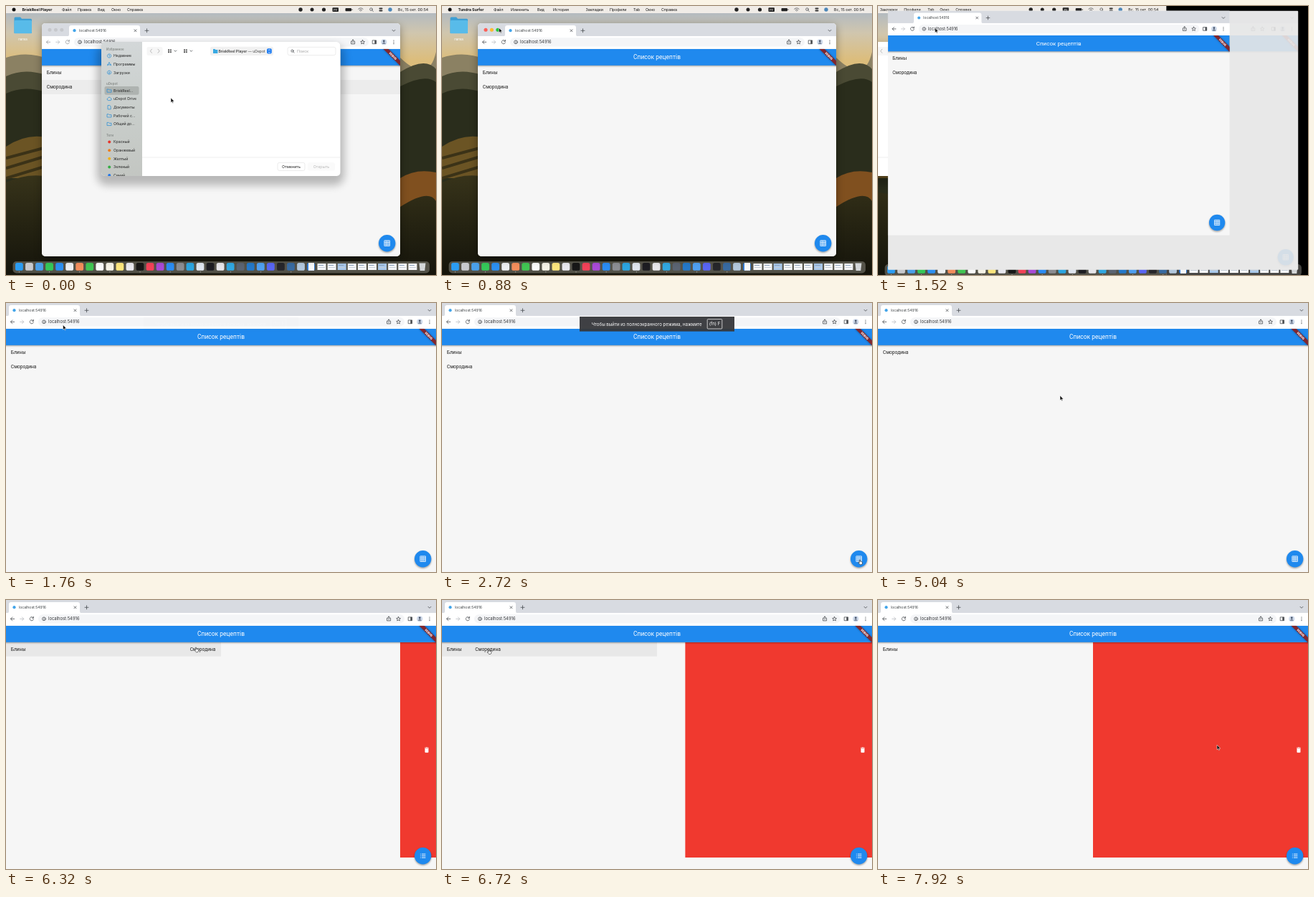
Recreate the animation shown at these times as an HTML page. Size 600 by 375 pixels, loop 8000 ms.

```html
<!DOCTYPE html>
<html lang="ru">
<head>
<meta charset="utf-8">
<title>Список рецептів</title>
<style>
html, body { margin: 0; width: 100%; height: 100%; overflow: hidden; background: #f6f6f6; }
svg { display: block; width: 100vw; height: 100vh; }
text { font-family: Inter, sans-serif; white-space: pre; }
.app text { font-family: Roboto, sans-serif; }
.line { fill: none; stroke: #4a4d51; stroke-width: .8; stroke-linecap: round; stroke-linejoin: round; }
</style>
</head>
<body>
<svg id="stage" viewBox="0 0 600 375" preserveAspectRatio="none"></svg>
<script>
const LOOP = 8000, BAR = 35.7, TOP = 59, ROW = 20, CELL = 300;
const BLUE = '#1f89ee', RED = '#f0392f', PAGE = '#f6f6f6';

// Markup helpers; text is centred on y
const rect = (x, y, w, h, fill, more = '') =>
  `<rect x="${x}" y="${y}" width="${w}" height="${h}" fill="${fill}" ${more}/>`;
const dot = (x, y, r, fill, more = '') =>
  `<circle cx="${x}" cy="${y}" r="${r}" fill="${fill}" ${more}/>`;
const path = (d, more = 'class="line"') => `<path d="${d}" ${more}/>`;
const text = (x, y, s, size, fill = '#222', more = '') =>
  `<text x="${x}" y="${y + size * .36}" font-size="${size}" fill="${fill}" ${more}>${s}</text>`;
const group = (id, body) => `<g id="${id}">${body}</g>`;

const gridIcon = path('M3 3H21V21H3ZM9 3V21M15 3V21M3 9H21M3 15H21', 'fill="none" stroke="#fff" stroke-width="2"');
const listIcon = path('M8 6H21M8 12H21M8 18H21M3 6H5M3 12H5M3 18H5', 'fill="none" stroke="#fff" stroke-width="2.2"');
const binIcon = path('M6 19c0 1.1.9 2 2 2h8c1.1 0 2-.9 2-2V7H6zM19 4h-3.5l-1-1h-5l-1 1H5v2h14z', 'fill="#fff"');

function fab(w, h, icons) {
  return `<g transform="translate(${w - 18.3} ${h - 18.3})">
    ${dot(0, 1.4, 11.9, '#000', 'opacity=".32" filter="url(#soft)"')}${dot(0, 0, 11.7, BLUE)}
    <g transform="translate(-5 -5) scale(.4167)">${icons}</g></g>`;
}

function toolbar(name, w, tab) {
  const x = tab + 4, r = w - 600;
  return rect(0, 0, w, 18.5, '#d8dbe1') +
    path(`M${x - 3} 18.5q3 0 3-3V6q0-3 3-3H${x + 96}q3 0 3 3V15.5q0 3 3 3Z`, 'fill="#fff"') +
    dot(x + 7.5, 10.2, 2.1, '#42a5ea') +
    text(x + 14, 10.2, 'localhost:54916', 5.1, '#3c4043') +
    path(`M${x + 91} 8.8l3 3m0-3l-3 3M${x + 106} 10.3h5m-2.5-2.5v5M${r + 589} 9.3l2 2 2-2`) +
    rect(0, 18, w, BAR - 18, '#fff') +
    rect(45, 20.2, w - 89, 12.2, '#f4f5f7', 'rx="6.1"') +
    group(name + 'Nav', path('M11.7 26.3H6.6m2.3-2.4l-2.4 2.4 2.4 2.4M38 24.7a2.6 2.6 0 1 0 .4 2.2M38.4 23.3v1.9h-2')) +
    path('M19.7 26.3h5m-2.3-2.4l2.4 2.4-2.4 2.4', 'class="line" style="stroke:#b9bcc0"') +
    dot(53, 26.3, 2.4, 'none', 'class="line"') + path('M53 26.2v1.2m0-2.5v.1') +
    text(59, 26.3, 'localhost:54916', 5.85, '#303235') +
    `<g transform="translate(${r} 0)">` +
    path('M532.6 25.2h-1v3.7h5v-3.7h-1M534.1 27.2v-4.2m-1.3 1.2l1.3-1.3 1.3 1.3M547.6 23.4l.9 1.9 2 .2-1.5 1.4.4 2-1.8-1-1.8 1 .4-2-1.5-1.4 2-.2ZM561.6 23.9h5v4.8h-5Z') +
    rect(564.3, 23.9, 2.4, 4.8, '#4a4d51') +
    dot(577.3, 26.3, 4.1, '#cfdaea') + dot(577.3, 25, 1.4, '#47536a') +
    path('M574.6 28.6q2.7-3.4 5.4 0Z', 'fill="#47536a"') +
    [24.1, 26.3, 28.5].map(y => dot(591, y, .65, '#4a4d51')).join('') + '</g>';
}

function browser(name, w, h, tab, body, icons) {
  return `<clipPath id="${name}Clip">${rect(0, BAR, w, h - BAR, '#000')}</clipPath>` +
    rect(0, 0, w, h, PAGE) +
    `<g class="app" clip-path="url(#${name}Clip)">${body}
      ${rect(-4, BAR, w + 8, 24, '#000', 'opacity=".4" filter="url(#soft)"')}
      ${rect(0, BAR, w, TOP - BAR - .2, BLUE)}
      ${text(w / 2, 47.4, 'Список рецептів', 8.4, '#fff', 'letter-spacing=".06" text-anchor="middle"')}
      <g transform="translate(${w} ${BAR}) rotate(45)">
        ${rect(-17, 11.2, 34, 6, '#000', 'opacity=".3" filter="url(#soft)"')}
        ${rect(-17, 11.7, 34, 5, '#80272f')}
        ${text(0, 14.2, 'DEBUG', 4.2, '#fff', 'font-weight="900" text-anchor="middle"')}</g>
      ${fab(w, h, icons)}</g>` + toolbar(name, w, tab);
}

const item = (s, y) => text(6.8, y, s, 6.67, '#222');

function fileDialog() {
  const icons = {
    clock: 'M144 -2.6a2.6 2.6 0 1 0 .01 0M144 -1.4V.2l1.1.6',
    app: 'M141.5 2.3L144-2.6l2.5 4.9M141 .9h6',
    load: 'M144-2.6a2.6 2.6 0 1 0 .01 0M144-1.3V1.3m-1-1l1 1 1-1',
    folder: 'M141-2h2.2l.8.9h3v3.3h-6Z',
    cloud: 'M142.3 2a1.7 1.7 0 0 1 0-3.2 2 2 0 0 1 3.7 0 1.7 1.7 0 0 1 0 3.2Z',
    doc: 'M142-2.7h2.7l1.4 1.4v4H142Z'
  };
  const rows = [
    [69.5, 'clock', 'Недавние'], [81, 'app', 'Программы'], [92.7, 'load', 'Загрузки'],
    [118, 'folder', 'BriskReel...'], [129.6, 'cloud', 'uDepot Drive'], [141.2, 'doc', 'Документы'],
    [152.8, 'folder', 'Рабочий с...'], [164.4, 'folder', 'Общий до...']
  ];
  const tags = [['Красный', '#e5352c'], ['Оранжевый', '#ee7d1d'], ['Желтый', '#eeb11c'], ['Зеленый', '#35ad45'], ['Синий', '#2477e8']];
  const heads = [[60, 'Избранное'], [108.2, 'uDepot'], [180, 'Теги']];
  const blue = 'fill="none" stroke="#2b8fd6" stroke-width=".75"';
  return rect(127, 54, 345, 196, '#000', 'rx="14" opacity=".25" filter="url(#wide)"') +
    rect(133, 50, 333.5, 187, '#bbb', 'rx="5"') +
    `<g clip-path="url(#dialogClip)">${rect(133, 50, 334, 187, '#fff')}${rect(133, 50, 57, 187, 'url(#side)')}
      ${rect(137.5, 112, 48, 11.8, '#aeb3b0', 'rx="2.2"')}
      ${heads.map(([y, s]) => text(140, y, s, 4.5, '#868b88', 'font-weight="600"')).join('')}
      ${rows.map(([y, k, s]) => `<g transform="translate(0 ${y})">${path(icons[k], blue)}</g>` + text(150, y, s, 5.2)).join('')}
      ${tags.map(([s, c], i) => dot(144.2, 189.5 + i * 11.65, 2, c) + text(150, 189.5 + i * 11.65, s, 5.2)).join('')}</g>` +
    rect(196.5, 57, 22, 12, '#f6f6f6', 'rx="2.5"') +
    path('M203.5 60.2l-2.2 2.6 2.2 2.6M212 60.2l2.2 2.6-2.2 2.6', 'class="line" style="stroke:#aaa"') +
    [226, 248].map(x => [0, 1, 2, 3].map(i => rect(x + i % 2 * 2.8, 60.4 + (i >> 1) * 2.8, 2, 2, '#555')).join('') +
      path(`M${x + 9} 62l1.4 1.4 1.4-1.4`)).join('') +
    rect(285, 56.7, 88, 12.4, '#f1f1f1', 'rx="2.6"') +
    path('M289 60h2.6l.8 1h3v5H289Z', 'fill="#38a9e2"') +
    text(296.5, 63, '<tspan font-weight="600">BriskReel Player</tspan> — uDepot', 5.1, '#444') +
    rect(364, 59.3, 6.8, 7.2, '#2480f3', 'rx="1.8"') +
    path('M366.2 62l1.2-1.3 1.2 1.3M366.2 64l1.2 1.3 1.2-1.3', 'fill="none" stroke="#fff" stroke-width=".7"') +
    rect(393, 57.3, 67, 11.3, '#fff', 'rx="2.5" stroke="#e0e0e0" stroke-width=".6"') +
    dot(399.5, 62.6, 1.6, 'none', 'class="line"') + path('M400.8 63.9l1.2 1.2') +
    text(406, 63, 'Поиск', 5.3, '#a5a5a5') +
    rect(190, 210.7, 276.5, .6, '#e4e4e4') +
    rect(379, 218.3, 38, 11.2, '#fff', 'rx="2.5" stroke="#ddd" stroke-width=".6"') +
    text(398, 224, 'Отменить', 5.4, '#222', 'text-anchor="middle"') +
    rect(421, 218.3, 38, 11.2, '#fafafa', 'rx="2.5"') +
    text(440, 224, 'Открыть', 5.4, '#b9b9b9', 'text-anchor="middle"');
}

// Evening hills, from far to near
function wallpaper() {
  return rect(0, 0, 600, 375, 'url(#sky)') +
    path('M0 72Q30 62 60 74T300 60T550 72T600 64V375H0Z', 'fill="#8b8163"') +
    path('M0 98Q25 86 55 96T300 110T550 92T600 88V375H0Z', 'fill="#4a4a34"') +
    path('M0 122Q25 110 55 120T300 130T550 112T600 106V375H0Z', 'fill="#2a2d1c"') +
    path('M0 196Q30 176 60 184T300 240H0Z', 'fill="#6b5424"') +
    path('M0 212L60 196M0 226L60 208M0 240L60 222', 'stroke="#3b3217" stroke-width="4"') +
    path('M550 240Q572 226 600 232V288H550Z', 'fill="#80501f"') +
    path('M0 246Q30 232 60 238T300 275T550 280T600 272V375H0Z', 'fill="url(#ground)"');
}

const menu = (id, name, words) => group(id, text(22.5, 5, name, 5.3, '#111', 'font-weight="700"') +
  words.map(([x, s]) => text(x, 5, s, 5.3, '#111')).join(''));

function menuBar() {
  return rect(0, 0, 600, 10, '#f0ece7') + dot(11, 5, 2.5, '#111') +
    menu('menuA', 'BriskReel Player', [[78, 'Файл'], [100, 'Правка'], [128, 'Вид'], [147, 'Окно'], [169, 'Справка']]) +
    menu('menuB', 'Tundra Surfer', [[72, 'Файл'], [96, 'Изменить'], [133, 'Вид'], [155, 'История'], [200.5, 'Закладки'],
      [234, 'Профили'], [267, 'Tab'], [284, 'Окно'], [306, 'Справка']]) +
    dot(411, 5, 2.7, '#222') + dot(427, 5, 2.5, '#222') + dot(443.5, 5, 2.6, '#222') +
    rect(455.5, 2.2, 8.5, 5.8, '#222', 'rx="1"') + text(459.7, 5.1, 'РУ', 4, '#fff', 'text-anchor="middle"') +
    rect(473.5, 3, 8.5, 4.3, '#222', 'rx="1"') + rect(482.6, 4.3, .8, 1.7, '#222') +
    path('M491.7 4.2q3.2-2.8 6.4 0M493.2 5.8q1.7-1.5 3.4 0M494.9 7.2v.1') +
    dot(509.5, 4.6, 1.8, 'none', 'class="line"') + path('M510.9 6l1.5 1.5') +
    rect(520.5, 2.5, 5, 2.1, '#333', 'rx="1"') + rect(520.5, 5.4, 5, 2.1, '#333', 'rx="1"') +
    dot(536, 5, 2.7, '#4c86b8') + text(547, 5, 'Вс, 15 окт. 00:54', 5.3, '#111');
}

function dock() {
  const tones = ('#2b9cf2 #c7c9cd #4a9fe8 #35c759 #2c8ff0 #eceef0 #f28d5b #41c553 #fafafa #f5f2e6 #fbe57d #e8e8ee #171717 #f24258 ' +
    '#a84ad6 #2b8cf2 #8b8d92 #2ca5e0 #dfe5ee #1d1d22 #e6e6ea #31a7e0 #5b6472 #2478c8 #4f9ff0 #5865f2 #26262a #386aa0 #b2c7dc #2f7fe2').split(' ');
  return rect(9.5, 356, 581.5, 16.5, '#c6c3ba', 'rx="5" opacity=".35"') +
    tones.map((c, i) => rect(13 + i * 14.05 - (i > 16 ? .3 : 0), 358, 10.8, 10.8, c, 'rx="2.6"') +
      (i % 3 ? '' : dot(18.4 + i * 14.05, 370.7, .5, '#ddd'))).join('') +
    Array.from({ length: 10 }, (_, i) => rect(434.5 + i * 14.1, 359, 12, 9, i % 4 === 2 ? '#a9c8ea' : '#f6f7f9') +
      rect(436 + i * 14.1, 361, 7, 1, '#8aa1bd') + rect(436 + i * 14.1, 364, 9, 1, '#c4ccd6')).join('') +
    rect(422, 358, 8, 10.8, '#f8f8f8') + path('M576.5 358.5h9l-1.2 10.5h-6.6Z', 'fill="#d3d6d8"');
}

const recipes = group('red', rect(0, 0, 600, 1, RED, 'id="redBox"')) +
  group('bin', `<g transform="translate(-5 -5) scale(.4167)">${binIcon}</g>`) +
  rect(0, TOP, 600, ROW, '#e8e8e8', 'id="hot"') +
  group('first', item('Блины', 0)) + group('second', item('Смородина', 0));

const toast = rect(192, 19, 216, 20.6, '#36373a', 'opacity=".95"') +
  text(208.7, 29.3, 'Чтобы выйти из полноэкранного режима, нажмите', 6.13, '#fff') +
  rect(370.2, 22.6, 20.6, 13.4, 'none', 'rx="1" stroke="#e6e6e6" stroke-width=".8"') +
  text(380.5, 29.3, '(fn) F', 6.1, '#fff', 'text-anchor="middle"');

const stop = (o, c) => `<stop offset="${o}" stop-color="${c}"/>`;
stage.innerHTML = `<defs>
  <linearGradient id="sky" x2="0" y2="1">${stop(0, '#a9b6c6')}${stop(.1, '#d0c6ae')}${stop(.2, '#dcbd7c')}</linearGradient>
  <linearGradient id="ground" x2="0" y2="1">${stop(0, '#37331a')}${stop(.5, '#252312')}${stop(1, '#15140b')}</linearGradient>
  <linearGradient id="side" x2="0" y2="1">${stop(0, '#d3d7d8')}${stop(.5, '#c9cecb')}${stop(1, '#c3c6c2')}</linearGradient>
  <filter id="soft" x="-50%" y="-50%" width="200%" height="200%"><feGaussianBlur stdDeviation="1.2"/></filter>
  <filter id="wide" x="-20%" y="-20%" width="140%" height="140%"><feGaussianBlur stdDeviation="6"/></filter>
  <clipPath id="dialogClip">${rect(133, 50, 333.5, 187, '#000', 'rx="5"')}</clipPath>
  <clipPath id="frameClip">${rect(0, 0, 600, 375, '#000', 'id="frameBox"')}</clipPath>
  ${group('dialog', fileDialog())}</defs>
  ${rect(0, 0, 600, 375, '#000')}
  ${group('desk', wallpaper() +
    path('M11.5 17q0-1.5 1.5-1.5h7l2 2.2h12.5q1.5 0 1.5 1.5V38H11.5Z', 'fill="#3d9fd4"') +
    rect(11.5, 20, 24.5, 18.2, '#58bbe9', 'rx="1.5"') +
    text(23.5, 46.5, 'папка', 4.4, '#fff', 'text-anchor="middle"') +
    '<use href="#dialog" id="dialogBack"/>' + menuBar())}
  ${group('dockBar', dock())}
  ${group('frame', rect(0, 3, 500, 325, '#000', 'id="winShadow" rx="5" opacity=".35" filter="url(#wide)"') +
    `<g clip-path="url(#frameClip)">${rect(0, 0, 600, 375, '#e6e6e6')}` +
    group('full', browser('full', 600, 375, 0, recipes, group('toGrid', gridIcon) + group('toList', listIcon))) +
    group('win', browser('win', 500, 325, 34, rect(0, 79, 500, ROW, '#ececec', 'id="winHot"') +
      item('Блины', 69) + item('Смородина', 89), gridIcon) +
      group('lights', ['#ff5f57', '#febc2e', '#28c840'].map((c, i) =>
        dot(11 + i * 8.4, 9.3, 2.5, '#c6c8cc') + dot(11 + i * 8.4, 9.3, 2.5, c, 'class="lit"')).join(''))) + '</g>')}
  <use href="#dialog" id="dialogFront"/>
  ${group('toast', toast)}
  ${group('arrow', path('M0 0V8.2L1.9 6.5 3.1 9.2 4.4 8.6 3.2 6H5.8Z', 'fill="#111" stroke="#fff" stroke-width=".6"'))}
  ${group('hand', path('M-.8.7Q-.8 0 0 0T.8.7V2.8Q1.7 2.4 2 3.2 3 2.8 3.2 3.6 4.3 3.4 4.3 4.4V6Q4.3 8 2.6 8.2H.6Q-.7 7.4-2.4 5 -2.7 4-1.8 4.1L-.8 5Z', 'fill="#fff" stroke="#111" stroke-width=".7"'))}`;

const el = {};
stage.querySelectorAll('[id]').forEach(n => el[n.id] = n);
const lit = stage.querySelectorAll('.lit');

const clamp = (v, a = 0, b = 1) => Math.min(b, Math.max(a, v));
const ramp = (t, a, b) => clamp((t - a) / (b - a));
const wave = u => .5 - .5 * Math.cos(Math.PI * u);
const within = (t, a, b) => t >= a && t < b;
const show = (node, on) => node.style.display = on ? '' : 'none';
const move = (node, x, y, sx = 1, sy = sx) =>
  node.setAttribute('transform', `translate(${x} ${y}) scale(${sx} ${sy})`);
const fade = (node, o) => { node.style.opacity = o; show(node, o > 0); };
const size = (node, w, h) => { node.setAttribute('width', w); node.setAttribute('height', h); };

// Pointer stops: time, x, y
const stops = [[0, 230, 128], [100, 230, 128], [820, 79.5, 30.5], [1860, 79.5, 30.5], [2560, 583, 358], [3220, 583, 358],
  [3760, 199, 164], [4440, 480, 67], [4500, 480, 67], [4760, 200, 67], [4860, 200, 67], [5040, 254, 129], [5280, 254, 129],
  [5680, 583, 358], [5840, 583, 358], [6180, 315, 66], [6240, 315, 66], [6320, 265, 66], [6540, 59, 66], [6700, 59, 66],
  [6960, 445, 240], [7160, 445, 240], [7440, 520, 170], [7580, 520, 170], [7900, 473, 202], [8000, 473, 202]];

function pointer(t) {
  const i = stops.findIndex(s => s[0] > t), a = stops[i - 1], b = stops[i];
  const u = wave(ramp(t, a[0], b[0]));
  return [a[1] + (b[1] - a[1]) * u, a[2] + (b[2] - a[2]) * u];
}

function drawDesk(t) {
  const active = t >= 640, p = wave(ramp(t, 1080, 1760));
  const w = 500 + 100 * p, h = 325 + 50 * p;
  move(el.desk, -600 * p ** 3.45, 0);
  show(el.desk, p < 1);
  show(el.dialogBack, active);
  show(el.dialogFront, !active);
  show(el.menuA, !active);
  show(el.menuB, active);
  move(el.dockBar, 0, 20 * ramp(t, 1460, 1760));
  move(el.frame, 50 * (1 - p), 24 * (1 - p));
  size(el.frameBox, w, h);
  el.frameBox.setAttribute('rx', 5 * (1 - p));
  size(el.winShadow, w, h);
  show(el.winShadow, p < .3);
  move(el.full, 0, 0, w / 600, h / 375);
  fade(el.full, ramp(t, 1500, 1740));
  move(el.win, 0, 0, 1 - .064 * p, 1 - .051 * p);
  fade(el.win, 1 - ramp(t, 1600, 1760));
  show(el.winHot, !active);
  el.winNav.style.opacity = active ? 1 : .55;
  show(el.lights, p < .3);
  lit.forEach(n => show(n, active));
}

function drawList(t, x) {
  const grid = within(t, 2860, 3180) || t >= 5760;
  const swipeRow = within(t, 4500, 5760), swipeCell = t >= 6240;
  const width = grid ? CELL : 600;
  let pull = 0, height = grid ? CELL : ROW;
  if (swipeRow) {
    pull = t < 4760 ? 480 - x : 280 + 320 * wave(ramp(t, 4760, 4860));
    height = ROW * (1 - wave(ramp(t, 4860, 4980)));
  } else if (swipeCell) {
    pull = t < 6700 ? 315 - x : 256 + 44 * wave(ramp(t, 6700, 6800));
  }
  const open = pull > 0 && height > .1;
  show(el.red, open);
  move(el.red, 600 - pull, TOP);
  size(el.redBox, pull, height);
  show(el.bin, open && pull > 18 && height > 8);
  move(el.bin, 587, TOP + height / 2);
  show(el.first, !(swipeRow && pull >= 600));
  move(el.first, swipeRow ? -pull : 0, 69);
  show(el.second, !(swipeCell && pull >= width));
  if (grid) move(el.second, CELL - pull, 69);
  else move(el.second, 0, swipeRow ? 69 + height : 89);
  const hotRow = within(t, 4440, 4860), hotRight = within(t, 6130, 6270), hotLeft = within(t, 6270, 6730);
  show(el.hot, hotRow || hotRight || hotLeft);
  size(el.hot, hotRow ? 600 - pull : CELL, ROW - .4);
  el.hot.setAttribute('x', hotRight ? CELL - pull : 0);
  show(el.toGrid, !grid);
  show(el.toList, grid);
}

function draw(t) {
  const [x, y] = pointer(t);
  drawDesk(t);
  drawList(t, x);
  fade(el.toast, ramp(t, 1760, 1900) * (1 - ramp(t, 3480, 3620)));
  const hand = t > 1900 && (Math.hypot(x - 582, y - 357) < 12 || within(t, 4440, 4860) || within(t, 6130, 6730));
  show(el.hand, hand);
  show(el.arrow, !hand);
  move(hand ? el.hand : el.arrow, x, y, .82);
}

const start = performance.now();
function tick() {
  draw((performance.now() - start) % LOOP);
  requestAnimationFrame(tick);
}
tick();
</script>
</body>
</html>
```
